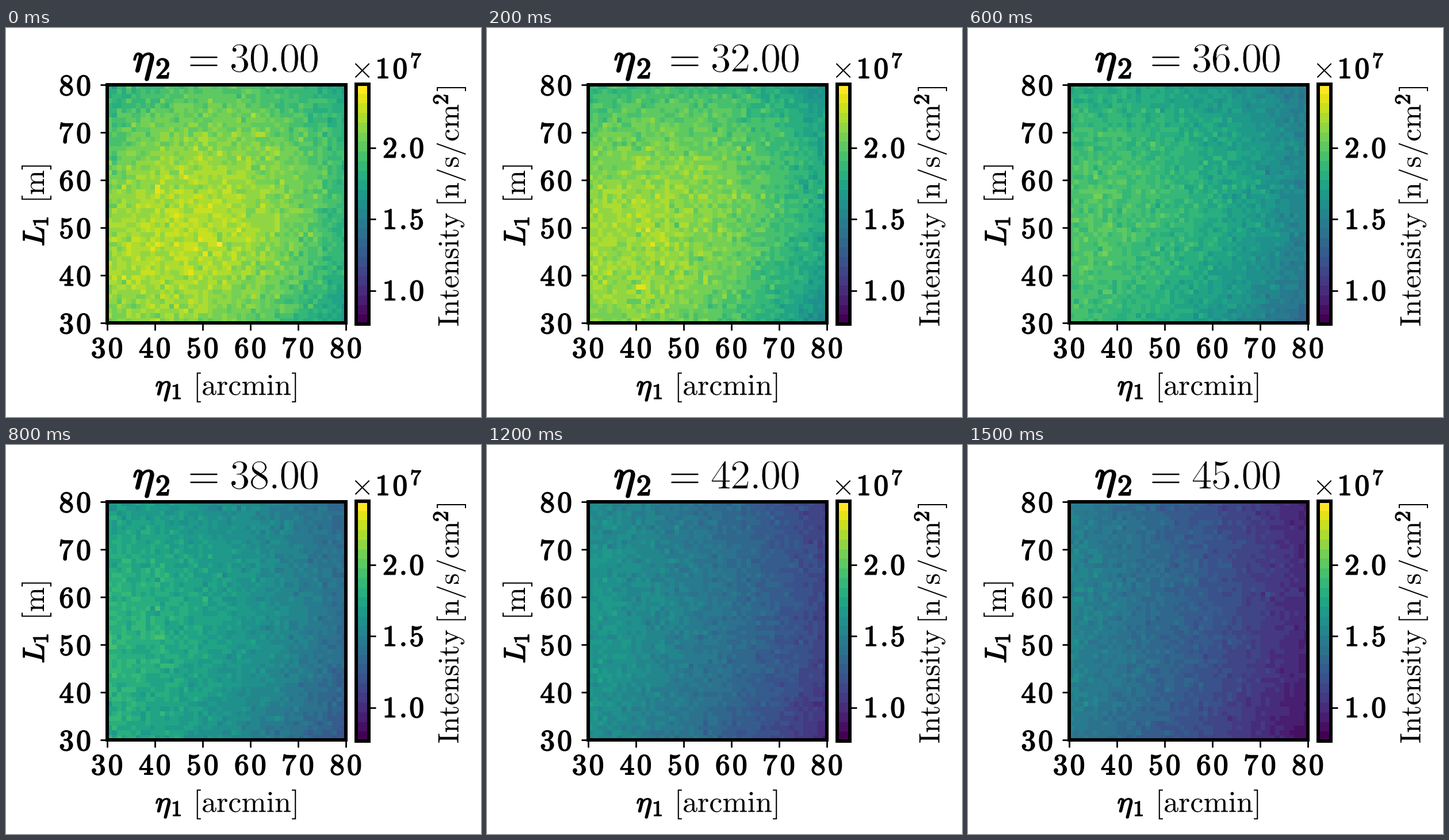
A matplotlib script that plays this animation: 826 by 678 pixels, repeating every 1600 ms.

```python
import numpy as np
import matplotlib.pyplot as plt
from matplotlib.animation import FuncAnimation
from matplotlib.patches import PathPatch, Rectangle
from matplotlib.textpath import TextPath
from matplotlib.transforms import Affine2D

W, H = 826, 678
PT = 0.72                      # points per pixel at 100 dpi
FRAMES, STEP_MS = 16, 100
CELLS, BANDS = 50, 25
LEFT, RIGHT, TOP, BOTTOM = 176.0, 591.3, 99.2, 514.4
BAR = (609.0, 630.8, 98.0, 516.0)
LINE, TICK, TICK_LEN = 6.0, 2.8, 12.2
TEXT, BOLD, SUB, TITLE = 52, 51, 38, 72

plt.rcParams["mathtext.fontset"] = "cm"
fig = plt.figure(figsize=(W / 100, H / 100), dpi=100, facecolor="white")
ax = fig.add_axes([0, 0, 1, 1])
ax.set_xlim(0, W)
ax.set_ylim(H, 0)
ax.axis("off")


def text_path(tex, x, y, size, align=0.0, vertical=False):
    """Outline with its baseline at y; align 0..1 sets the ink edge at x."""
    path = TextPath((0, 0), f"${tex}$", size=size)
    box = path.get_extents()
    move = Affine2D().translate(-box.x0 - align * box.width, 0).scale(1, -1)
    if vertical:
        move.rotate_deg(-90)
    return move.translate(x, y).transform_path(path)


def add_text(path, weight=0.0):
    """Positive weight thickens the strokes, negative weight thins them."""
    edge = "black" if weight > 0 else "white" if weight < 0 else "none"
    patch = PathPatch(path, fc="black", ec=edge, lw=abs(weight) * PT,
                      joinstyle="round", zorder=5)
    ax.add_patch(patch)
    return patch


def label(tex, x, y, size, weight=0.0, **kw):
    return add_text(text_path(tex, x, y, size, **kw), weight)


def number_paths(text, x, y, size, style, cell, dot):
    """One outline per character, each centred in its own cell."""
    paths = []
    for ch in text:
        width = size * (dot if ch == "." else cell)
        tex = rf"\{style}{{{ch}}}"
        paths.append(text_path(tex, x + width / 2, y, size, align=0.5))
        x += width
    return paths


def bold_number(text, x, y, size=BOLD, weight=1.8):
    for path in number_paths(text, x, y, size, "mathbf", 0.585, 0.325):
        add_text(path, weight)


def title_paths(value):
    return number_paths(f"{value:.2f}", 389.5, 76.3, TITLE, "mathrm", 0.472, 0.26)


def line(x0, y0, x1, y1):
    ax.plot([x0, x1], [y0, y1], color="black", lw=TICK * PT,
            solid_capstyle="butt", zorder=4)


def frame_box(x0, x1, y0, y1):
    ax.add_patch(Rectangle((x0, y0), x1 - x0, y1 - y0, fill=False, ec="black",
                           lw=LINE * PT, joinstyle="miter", zorder=6))


def intensity(i):
    """Noisy quadratic surface, scaled to 0..1 over the colour range."""
    eta = 30 + i
    mid = np.interp(eta, [30, 32, 34, 36, 38, 42, 45],
                    [.855, .80, .725, .64, .55, .405, .31])

    def coef(*values):
        return np.interp(eta, [30, 32, 36, 45], values)

    s = (np.arange(CELLS) + 0.5) / CELLS * 2 - 1
    u, w = np.meshgrid(s, s)
    v = (mid + coef(-.07, -.115, -.135, -.17) * u
         + coef(-.035, -.03, 0, .015) * w
         + coef(-.13, -.10, -.06, -.02) * u**2
         + coef(-.11, -.10, -.075, -.04) * w**2
         + coef(.06, .05, .035, .01) * u * w)
    noise = np.random.default_rng(100 + i).normal(size=v.shape)
    return v + 0.025 * (v + 0.455) * noise


def draw_map(data, x0, x1, y0, y1):
    return ax.imshow(data, cmap=plt.get_cmap("viridis", BANDS), vmin=0, vmax=1,
                     extent=(x0, x1, y1, y0), origin="lower", aspect="auto",
                     interpolation="nearest", zorder=1)


heat = draw_map(intensity(0), LEFT, RIGHT, TOP, BOTTOM)
draw_map((np.arange(BANDS)[:, None] + 0.5) / BANDS, *BAR)
ax.set_xlim(0, W)
ax.set_ylim(H, 0)
frame_box(LEFT, RIGHT, TOP, BOTTOM)
frame_box(*BAR)

# Ticks and their numbers
for k in range(6):
    text = str(30 + 10 * k)
    x = LEFT + (RIGHT - LEFT) * k / 5
    y = BOTTOM - (BOTTOM - TOP) * k / 5
    line(x, BOTTOM, x, BOTTOM + TICK_LEN)
    line(LEFT - TICK_LEN, y, LEFT, y)
    bold_number(text, x - 30.3, 574.3)
    bold_number(text, 90.2, y + 17.6)

for k, text in enumerate(["2.0", "1.5", "1.0"]):
    y = 209 + 124.3 * k
    line(BAR[1], y, BAR[1] + TICK_LEN, y)
    bold_number(text, 652.8, y + 16.8)

label(r"\times", 607, 87.5, TEXT)
bold_number("10", 640.5, 87.3)
bold_number("7", 702, 69.3, SUB, 1.4)

# Axis labels
label(r"\eta", 261, 639.5, TEXT, 1.9)
label(r"\mathbf{1}", 290.5, 646.5, SUB, 1.6)
label(r"\mathrm{[arcmin]}", 418, 639.5, TEXT, align=0.5)

label("L", 66, 378.5, TEXT, 1.9, vertical=True)
label(r"\mathbf{1}", 73, 343.5, SUB, 1.6, vertical=True)
label(r"\mathrm{[m]}", 66, 269.5, TEXT, align=0.5, vertical=True)

label(r"\mathrm{Intensity}", 787, 519, BOLD, vertical=True)
label(r"\mathrm{[n/s/cm}", 787, 305.5, BOLD, vertical=True)
label(r"\mathbf{2}", 768.5, 132, SUB, 1.4, vertical=True)
label(r"\mathrm{]}", 787, 103, BOLD, align=1, vertical=True)

# Title
label(r"\eta", 222.5, 76.3, TITLE, 2.6)
label(r"\mathbf{2}", 262.5, 87.5, BOLD, 2.2)
label("=", 344, 76.3, TITLE, -0.4, align=0.5)
title = [add_text(path, -0.9) for path in title_paths(30)]


def update(i):
    heat.set_data(intensity(i))
    for patch, path in zip(title, title_paths(30 + i)):
        patch.set_path(path)
    return [heat, *title]


anim = FuncAnimation(fig, update, frames=FRAMES, interval=STEP_MS,
                     repeat=True, repeat_delay=0, blit=False)
plt.show()
```
